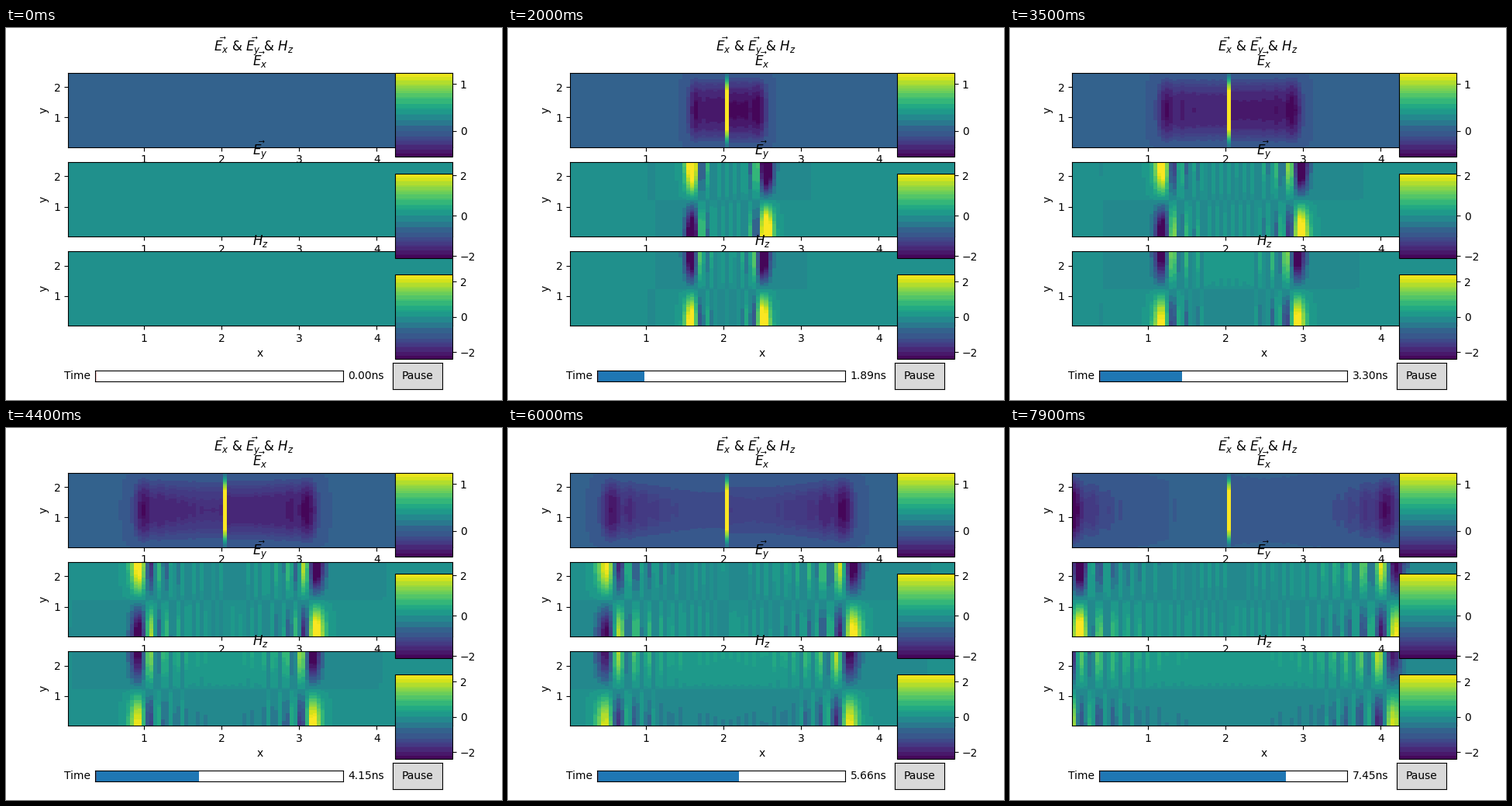
Write a matplotlib script that moves like this. It is 640 px wide and 480 px high and loops after 8 s.

```python
import numpy as np
import matplotlib.pyplot as plt
from matplotlib.animation import FuncAnimation
from matplotlib.colors import ListedColormap

FRAMES, INTERVAL = 80, 100
NX, NY, D = 100, 50, 0.05
COURANT = 0.8 / np.sqrt(2)
DT = COURANT * D / 0.299792458          # ns
T_MAX = 105 * DT
SRC = 41                                # excited cell
PULSE_STEPS, PULSE, SKEW = 5, 3.1, 0.03
E_SRC = 1.8                             # field held in the excited cell


def simulate():
    """Leapfrog steps for the amplitudes of the lowest guide mode."""
    ex, ey, hz = np.zeros(NX), np.zeros(NX + 1), np.zeros(NX)
    q = 2 * np.sin(np.pi / (2 * NY))
    states = [(ex.copy(), ey.copy(), hz.copy())]
    for n in range(1, FRAMES):
        ex[SRC] = E_SRC
        if n <= PULSE_STEPS:
            hz[SRC] += PULSE
            ey[SRC:SRC + 2] += SKEW * PULSE
        hz += COURANT * (q * ex - np.diff(ey))
        ex -= COURANT * q * hz
        ey[1:-1] -= COURANT * np.diff(hz)
        ex[SRC] = E_SRC
        states.append((ex.copy(), ey.copy(), hz.copy()))
    return states


def banded_viridis():
    """Viridis with neighbouring shades merged into flat bands."""
    rgb = plt.get_cmap("viridis")(np.arange(256))[:, :3]
    weight = np.ones(256)
    weight[[78, 128]] = 60              # keep the rest levels exact
    key = np.floor(rgb * 255 / [32, 16, 32]) @ [256, 16, 1]
    out = rgb.copy()
    for k in np.unique(key):
        band = key == k
        out[band] = np.average(rgb[band], axis=0, weights=weight[band])
    return ListedColormap(out)


STATES = simulate()
PHASE = np.pi * np.arange(1, NY) / NY
HALF = np.pi / (2 * NY)
PROFILES = [np.sin(PHASE), np.cos(PHASE + HALF), np.cos(PHASE + HALF)]


def field(n, i):
    return np.outer(PROFILES[i], STATES[n][i][1:NX])


fig = plt.figure(figsize=(6.4, 4.8), dpi=100, facecolor="white")
fig.subplots_adjust(bottom=0.2)
fig.suptitle(r"$\vec{E_x}$ & $\vec{E_y}$ & $H_z$")

cmap = banded_viridis()
titles = [r"$\vec{E_x}$", r"$\vec{E_y}$", r"$H_z$"]
limits = [(-0.55, 1.24), (-2.09, 2.09), (-2.385, 2.385)]
ticks = [[0, 1], [-2, 0, 2], [-2, 0, 2]]
extent = (D / 2, NX * D - D / 2, D / 2, NY * D - D / 2)

images = []
for i in range(3):
    ax = fig.add_subplot(3, 1, i + 1)
    images.append(ax.imshow(field(0, i), cmap=cmap, vmin=limits[i][0],
                            vmax=limits[i][1], extent=extent, origin="lower",
                            aspect="auto", interpolation="nearest"))
    ax.set_title(titles[i])
    ax.set_xticks([1, 2, 3, 4])
    ax.set_yticks([1, 2])
    ax.set_ylabel("y")
ax.set_xlabel("x")

bar_h = 0.77 / 3.4
for i, im in enumerate(images):
    cax = fig.add_axes([0.78375, 0.88 - bar_h * (1 + 1.2 * i), 0.11625, bar_h])
    fig.colorbar(im, cax=cax, ticks=ticks[i])


def widget_axes(rect, color):
    a = fig.add_axes(rect, facecolor=color)
    a.set(xticks=[], yticks=[])
    return a


slider = widget_axes([0.18, 0.05, 0.5, 0.03], "white")
slider.set(xlim=(0, T_MAX), ylim=(0, 1))
slider.axvline(0, color="r", lw=1)
fill = plt.Rectangle((0, 0), 0, 1, color="C0", lw=0)
slider.add_patch(fill)
slider.text(-0.02, 0.5, "Time", transform=slider.transAxes,
            ha="right", va="center")
clock = slider.text(1.02, 0.5, "", transform=slider.transAxes,
                    ha="left", va="center")

button = widget_axes([0.78, 0.03, 0.1, 0.07], "0.85")
button.text(0.5, 0.5, "Pause", transform=button.transAxes,
            ha="center", va="center")


def update(n):
    for i, im in enumerate(images):
        im.set_data(field(n, i))
    fill.set_width(n * DT)
    clock.set_text(f"{n * DT:.2f}ns")
    return [*images, fill, clock]


anim = FuncAnimation(fig, update, frames=FRAMES, interval=INTERVAL,
                     repeat=True, repeat_delay=0, blit=False)
plt.show()
```
